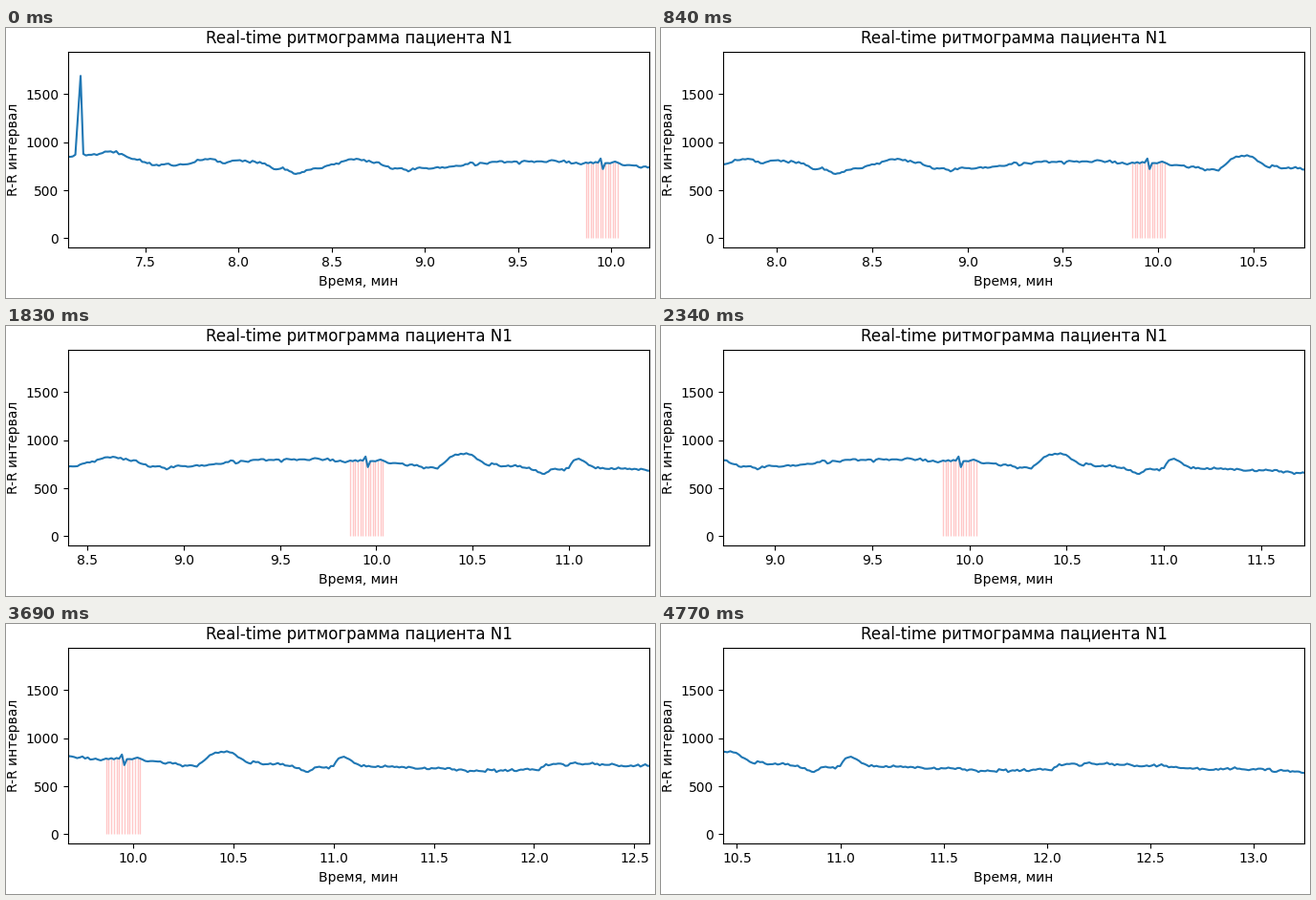
Write a matplotlib script that moves like this. It is 679 px wide and 283 px high and loops after 4.89 s.

```python
import numpy as np
import matplotlib.pyplot as plt
from matplotlib.animation import FuncAnimation

W, H, DPI = 679, 283, 100
TICK_MS, TICKS, STEPS = 30, 163, 40

# Slow course of the R-R interval: (minutes, ms)
TREND = [
    (7.08, 850), (7.33, 900), (7.45, 820), (7.55, 770), (7.68, 760),
    (7.85, 835), (7.92, 775), (8.0, 810), (8.1, 790), (8.3, 685),
    (8.45, 730), (8.6, 820), (8.68, 815), (8.82, 715), (9.1, 735),
    (9.25, 775), (9.63, 805), (10.1, 765), (10.32, 700), (10.38, 815),
    (10.47, 860), (10.57, 745), (10.75, 725), (10.87, 655), (11.0, 710),
    (11.02, 798), (11.06, 795), (11.13, 720), (11.7, 660), (12.0, 685),
    (12.09, 735), (12.25, 735), (12.6, 705), (13.25, 650),
]
# Single abnormal beats: (start in minutes, interval in ms)
ODD_BEATS = [(7.118, 1690), (9.93, 830), (9.94, 720)]
MARKED = (9.853, 10.036)

# Visible window: (update step, left, right) in minutes
WINDOW = [
    (0, 7.084, 10.205), (4, 7.4545, 10.53), (10, 7.98, 11.005),
    (15, 8.4, 11.417), (24, 9.153, 12.099), (30, 9.676, 12.574),
    (39, 10.433, 13.245),
]

# Each update holds for four ticks; these hold one tick longer
LONG_STEPS = (12, 16, 26)
STEP_AT = np.repeat(np.arange(STEPS),
                    [5 if s in LONG_STEPS else 4 for s in range(STEPS)])


def make_beats():
    rng = np.random.default_rng(4)
    trend_t, trend_rr = zip(*TREND)
    odd = list(ODD_BEATS)
    t, drift = trend_t[0], 0
    times, intervals = [t], [trend_rr[0]]
    while t < trend_t[-1]:
        if odd and t >= odd[0][0]:
            rr = odd.pop(0)[1]
        else:
            drift = 0.5 * drift + rng.normal(0, 8)
            rr = np.interp(t + 0.013, trend_t, trend_rr) + drift
        t += rr / 60000
        times.append(t)
        intervals.append(rr)
    return np.array(times), np.array(intervals)


fig = plt.figure(figsize=(W / DPI, H / DPI), dpi=DPI, facecolor="white")
left, right, top, bottom = 65.0, 672.9, 24.74, 229.74
ax = fig.add_axes([left / W, 1 - bottom / H,
                   (right - left) / W, (bottom - top) / H])
ax.set_title("Real-time ритмограмма пациента N1")
ax.set_xlabel("Время, мин")
ax.set_ylabel("R-R интервал")

beat_t, beat_rr = make_beats()
marked = (beat_t >= MARKED[0]) & (beat_t <= MARKED[1])
ax.vlines(beat_t[marked], 0, beat_rr[marked], color="red", alpha=0.22, lw=1)
ax.plot(beat_t, beat_rr, color="tab:blue", lw=1.5)
ax.set_ylim(-92.5, 1942.5)

key_steps, key_left, key_right = zip(*WINDOW)


def draw(tick):
    step = STEP_AT[tick]
    ax.set_xlim(np.interp(step, key_steps, key_left),
                np.interp(step, key_steps, key_right))
    return []


anim = FuncAnimation(fig, draw, frames=TICKS, init_func=lambda: draw(0),
                     interval=TICK_MS, repeat=True, repeat_delay=0)
plt.show()
```
